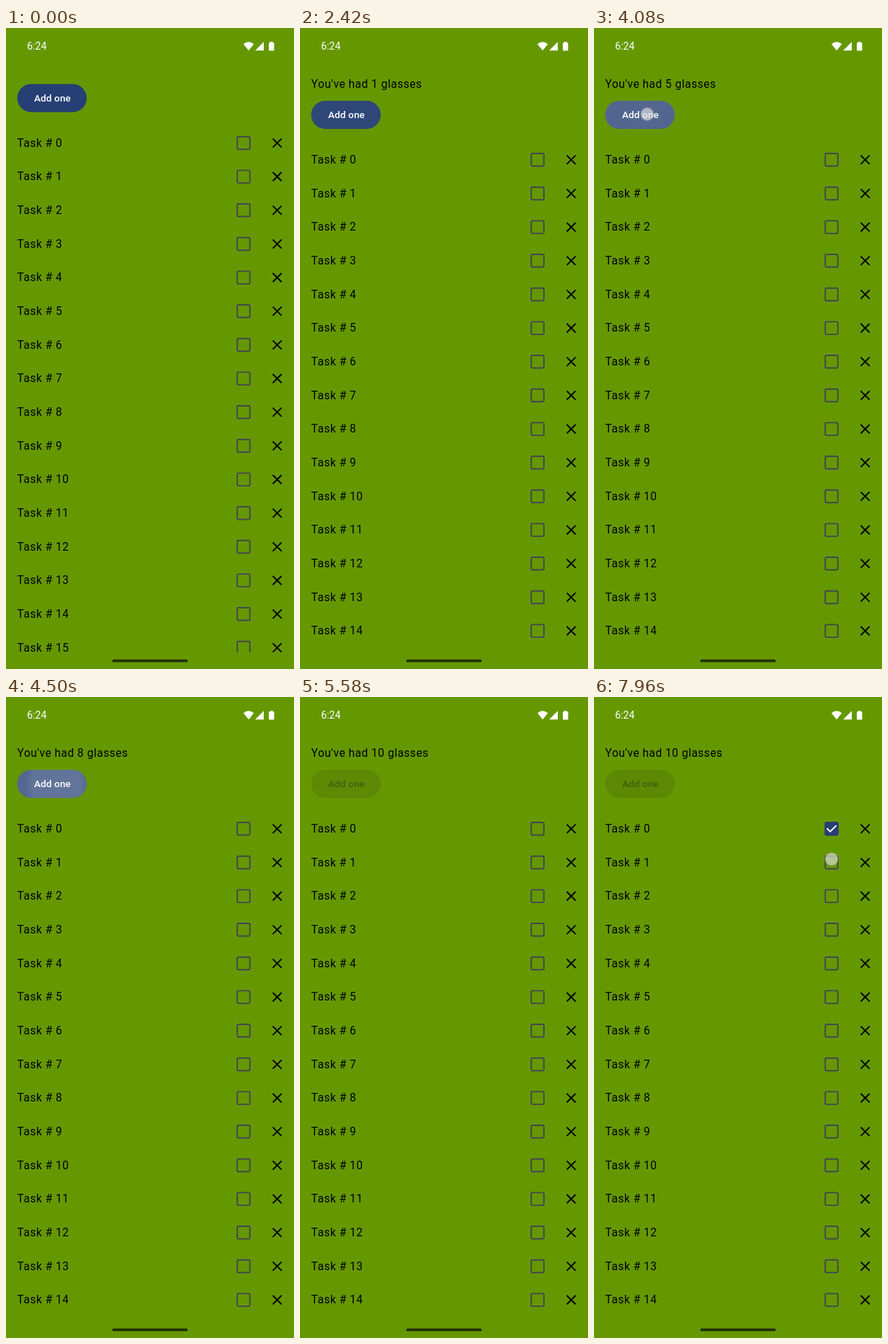
Animation of 400 by 889 pixels, one loop 8 s. Source, as an HTML page with a canvas:

```html
<!DOCTYPE html>
<html lang="en">
<head>
<meta charset="utf-8">
<title>Task list</title>
<style>
html, body { margin: 0; width: 100%; height: 100%; overflow: hidden; background: #659800; }
canvas { display: block; width: 400px; height: 889px; }
</style>
</head>
<body>
<canvas id="stage"></canvas>
<script>
const W = 400, H = 889, LOOP = 8000;
const DP = W / 411.43; // screen density: layout below is in dp
const BG = '#659800', PRIMARY = '#263f74', OUTLINE = '#44474e', INK = '#000';
const MAX_GLASSES = 10;
const HOLD = 80, ENTER = 450, EXIT = 375, RIPPLE_DELAY = 40;

// Release times of the taps on the button; each adds one glass.
const releases = [1800, 3220, 3450, 3680, 3900, 4110, 4290, 4470, 4640, 4810];
const tapStarts = releases.map(t => t - HOLD);
const CHECK_PRESS = 7050, CHECK_AT = 7140;

// Visible touches: start, end, x, y
const touches = [
  ...releases.map((t, i) => [t - HOLD, t, 76, i ? 122.9 : 100]),
  [4850, 4930, 76, 122.9],
  [CHECK_PRESS, CHECK_AT, 339.4, 186],
  [7940, LOOP, 339.4, 231.2]
];

const canvas = document.getElementById('stage');
const ctx = canvas.getContext('2d');
const ratio = window.devicePixelRatio || 1;
canvas.width = W * ratio;
canvas.height = H * ratio;

const clamp = v => Math.max(0, Math.min(1, v));
const easeOut = v => 1 - (1 - clamp(v)) ** 3;

function box(x, y, w, h, r, fill) {
  ctx.beginPath();
  ctx.roundRect(x, y, w, h, r);
  ctx.fillStyle = fill;
  ctx.fill();
}

function disc(x, y, r, fill) {
  ctx.beginPath();
  ctx.arc(x, y, r, 0, Math.PI * 2);
  ctx.fillStyle = fill;
  ctx.fill();
}

function poly(points, fill) {
  ctx.beginPath();
  points.forEach(p => ctx.lineTo(...p));
  ctx.fillStyle = fill;
  ctx.fill();
}

function line(points, color, width, cap = 'butt') {
  ctx.beginPath();
  points.forEach(p => ctx.lineTo(...p));
  ctx.strokeStyle = color;
  ctx.lineWidth = width;
  ctx.lineCap = cap;
  ctx.stroke();
}

// Text centred vertically on y
function label(str, x, y, size, weight, spacing, fill) {
  ctx.font = `${weight} ${size}px Roboto, sans-serif`;
  ctx.letterSpacing = spacing + 'px';
  ctx.fillStyle = fill;
  ctx.fillText(str, x, y + size * 0.342);
}

function statusBar() {
  label('6:24', 29.3, 25.4, 14, 400, 0, '#fff');
  ctx.beginPath();
  ctx.moveTo(337, 31.3);
  ctx.lineTo(329.8, 22.2);
  ctx.quadraticCurveTo(337, 16.2, 344.2, 22.2);
  ctx.fill();
  poly([[346, 31.3], [358, 31.3], [358, 19.2]], '#fff');
  box(365, 20.3, 7.4, 11.3, 1, '#fff');
  box(367, 19, 3.4, 2, 0.3, '#fff');
}

// Opacity and growth of a ripple started at a given time
function ripple(t, start) {
  const age = t - start - RIPPLE_DELAY;
  if (age < 0 || age > ENTER + EXIT) return null;
  return {
    alpha: clamp(age / 75) * (1 - clamp((age - ENTER) / EXIT)),
    grow: easeOut(age / ENTER)
  };
}

function button(t, count, cy) {
  const x = 16, y = cy - 20, w = 99.3, h = 40;
  const disabled = count >= MAX_GLASSES;
  box(x, y, w, h, 20, disabled ? 'rgba(27,27,31,.12)' : PRIMARY);
  label('Add one', 40, cy, 14, 500, 0.1, disabled ? 'rgba(27,27,31,.38)' : '#fff');

  ctx.save();
  ctx.beginPath();
  ctx.roundRect(x, y, w, h, 20);
  ctx.clip();
  for (const start of tapStarts) {
    const r = ripple(t, start);
    if (!r) continue;
    const radius = 20 + 65 * r.grow;
    const cx = 76 + (x + w / 2 - 76) * r.grow;
    const glow = ctx.createRadialGradient(cx, cy, radius * 0.75, cx, cy, radius);
    glow.addColorStop(0, `rgba(255,255,255,${0.09 * r.alpha})`);
    glow.addColorStop(1, 'rgba(255,255,255,0)');
    disc(cx, cy, radius, glow);
  }
  ctx.restore();
}

function checkbox(t, cx, cy, checkable) {
  const on = checkable ? clamp((t - CHECK_AT) / 100) : 0;
  const r = checkable && ripple(t, CHECK_PRESS);
  if (r) disc(cx, cy, 8 + 10 * r.grow, `rgba(38,63,116,${0.1 * r.alpha})`);

  ctx.beginPath();
  ctx.roundRect(cx - 9, cy - 9, 18, 18, 1.5);
  ctx.strokeStyle = on ? PRIMARY : OUTLINE;
  ctx.lineWidth = 2;
  ctx.stroke();
  if (!on) return;

  ctx.globalAlpha = on;
  box(cx - 9.5, cy - 9.5, 19, 19, 1.5, PRIMARY);
  ctx.globalAlpha = 1;
  const dx = 8 * clamp(on * 1.5 - 0.5), dx0 = 4 * clamp(on * 3);
  const tick = [[cx - 6, cy], [cx - 6 + dx0, cy + dx0]];
  if (dx) tick.push([cx - 2 + dx, cy + 4 - dx]);
  line(tick, '#fff', 2, 'square');
}

function cross(cx, cy) {
  const d = 6.3;
  line([[cx - d, cy - d], [cx + d, cy + d]], INK, 2);
  line([[cx - d, cy + d], [cx + d, cy - d]], INK, 2);
}

function list(t, top) {
  ctx.save();
  ctx.beginPath();
  ctx.rect(0, top, 412, 890.4 - top);
  ctx.clip();
  for (let i = 0; i < 16; i++) {
    const cy = top + 24 + 48 * i;
    label('Task # ' + i, 16, cy, 16, 400, 0.5, INK);
    checkbox(t, 339.4, cy, i === 0);
    cross(387.4, cy);
  }
  ctx.restore();
}

function touchDot(x, y) {
  disc(x, y, 9.4, 'rgba(225,225,225,.65)');
  ctx.beginPath();
  ctx.arc(x, y, 9, 0, Math.PI * 2);
  ctx.strokeStyle = 'rgba(120,120,120,.4)';
  ctx.lineWidth = 1;
  ctx.stroke();
}

function draw(t) {
  const count = releases.filter(r => t >= r).length;
  const shift = count ? 24 : 0;

  ctx.setTransform(ratio, 0, 0, ratio, 0, 0);
  ctx.fillStyle = BG;
  ctx.fillRect(0, 0, W, H);
  statusBar();
  box(147.5, 875.8, 105, 3.8, 1.9, '#22310a');

  ctx.scale(DP, DP);
  if (count) label(`You've had ${count} glasses`, 16, 80, 16, 400, 0.5, INK);
  button(t, count, 100 + shift);
  list(t, 140 + shift);
  for (const [start, end, x, y] of touches) {
    if (t >= start && t < end) touchDot(x, y);
  }
}

const begin = performance.now();
function tick() {
  draw((performance.now() - begin) % LOOP);
  requestAnimationFrame(tick);
}
tick();
</script>
</body>
</html>
```
